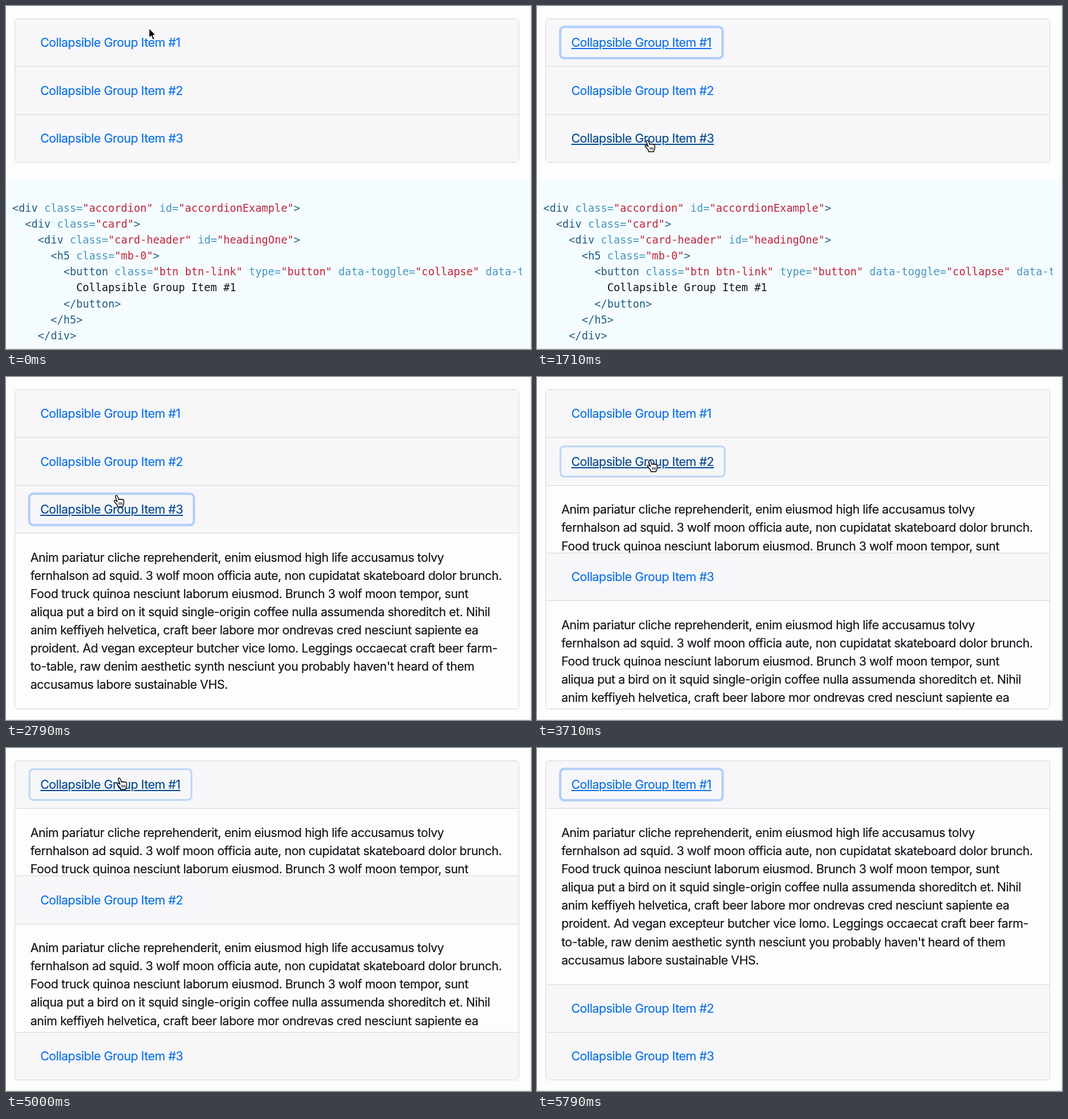
Recreate the animation shown at these times as an HTML page. Size 925x605 px, loop 7580 ms.

```html
<!DOCTYPE html>
<html lang="en">
<head>
<meta charset="utf-8">
<title>Accordion</title>
<style>
  * { box-sizing: border-box; }
  html, body { margin: 0; width: 100%; height: 100%; overflow: hidden; background: #fdfcff; }
  #stage { position: relative; width: 925px; height: 605px; overflow: hidden; font: 21.4px/32.1px Inter, sans-serif; color: #141418; }
  #accordion { margin: 22px 0 0 15px; width: 889px; border: 1px solid #d6d6d8; border-radius: 5px; overflow: hidden; -webkit-text-stroke: .2px; }
  .header { height: 84.33px; border-top: 1px solid #d6d6d8; padding: 16.2px 0 0 27px; background: #f7f7fa; }
  .header:first-child { height: 83.33px; border-top: 0; }
  .button { display: inline-block; height: 50.8px; padding: 9.3px 17.4px; border-radius: 5px; letter-spacing: -.43px; white-space: nowrap; vertical-align: top; }
  .body { border-top: 1px solid #d6d6d8; overflow: hidden; }
  .body div { padding: 25.7px 0 0 27px; white-space: pre; letter-spacing: -.43px; }
  #code { margin-top: 32px; height: 320px; padding-top: 35px; background: #f5fcff; }
  #code pre { margin: 0; width: 909px; padding-left: 11px; overflow: hidden; font: 18.73px/28.1px "DejaVu Sans Mono", monospace; }
  .tag { color: #225f86; }
  .attr { color: #4698c0; }
  .value { color: #c2263a; }
  #edge { position: absolute; inset: 0; border: solid #d9dfd6; border-width: 0 1px 1px 0; }
  #cursor { position: absolute; left: 0; top: 0; overflow: visible; }
</style>
</head>
<body>
<div id="stage">
  <div id="accordion"></div>
  <div id="code"><pre></pre></div>
  <div id="edge"></div>
  <svg id="cursor" width="24" height="24" stroke-linejoin="round">
    <path id="arrow" fill="#000" stroke="#fff" stroke-width="1.2"
      d="M0 0V17.5L4 13.8 6.8 20.6 9.8 19.3 7 12.7H12Z"/>
    <g id="hand" transform="translate(-6 -1)" stroke="#000" stroke-width="1.4">
      <path fill="#fff" d="M5 2.2C3.6 2.8 3.6 4 4 5L7 13 4 11C2 10 .8 11.5 2 13L7.5 19.5V22H16.5L18.5 16.5V10.5C18.5 8.8 16.4 8.6 15.8 10 15.6 8 13 7.8 12.6 9.5 12 7.8 10 8 9.6 9.4L7.4 3.4C7 2.2 6 1.8 5 2.2Z"/>
      <path fill="none" stroke-width="1.1" d="M10.3 14v4.5M12.8 14v4.5M15.3 14v4.5"/>
    </g>
  </svg>
</div>
<script>
const $ = selector => document.querySelector(selector);

const paragraph = `Anim pariatur cliche reprehenderit, enim eiusmod high life accusamus tolvy
fernhalson ad squid. 3 wolf moon officia aute, non cupidatat skateboard dolor brunch.
Food truck quinoa nesciunt laborum eiusmod. Brunch 3 wolf moon tempor, sunt
aliqua put a bird on it squid single-origin coffee nulla assumenda shoreditch et. Nihil
anim keffiyeh helvetica, craft beer labore mor ondrevas cred nesciunt sapiente ea
proident. Ad vegan excepteur butcher vice lomo. Leggings occaecat craft beer farm-
to-table, raw denim aesthetic synth nesciunt you probably haven't heard of them
accusamus labore sustainable VHS.`;

const markup = `<div class="accordion" id="accordionExample">
  <div class="card">
    <div class="card-header" id="headingOne">
      <h5 class="mb-0">
        <button class="btn btn-link" type="button" data-toggle="collapse" data-target="#collapseOne">
          Collapsible Group Item #1
        </button>
      </h5>
    </div>`;

$('#accordion').innerHTML = [1, 2, 3].map(number =>
  `<div class="header"><span class="button">Collapsible Group Item #${number}</span></div>
   <div class="body"><div>${paragraph}</div></div>`).join('');

$('#code pre').innerHTML = markup.replace(/<\/?\w+|>|[\w-]+=|"[^"]*"/g, token => {
  const kind = token[0] === '"' ? 'value' : token.endsWith('=') ? 'attr' : 'tag';
  return `<span class="${kind}">${token.replace('<', '&lt;')}</span>`;
});

const buttons = [...document.querySelectorAll('.button')];
const bodies = [...document.querySelectorAll('.body')];

const LOOP = 7580, BODY_HEIGHT = 310.3, WINDOW_ACTIVE = 13, CLICK_DELAY = 19.5;

// Which item has focus and which is open, from a given time in ms.
const states = [
  { at: 0, focus: -1, open: -1 },
  { at: 1240, focus: 0, open: -1 },
  { at: 2122, focus: 2, open: 2 },
  { at: 3597, focus: 1, open: 1 },
  { at: 4897, focus: 0, open: 0 }
];

// Pointer stops: step, x, y.
const stops = [
  [0, 252, 39], [5, 250, 52], [6, 233, 112], [7, 208, 196], [8, 195, 236],
  [28, 195, 208], [29, 196, 178], [30, 198, 154], [31, 199, 146],
  [42, 199, 134], [43, 199, 92], [44, 200, 60], [45, 200, 52],
  [55, 377, 6], [56, 400, -60]
];

const lastUpTo = (list, fits) => list.filter(fits).pop();
const pointerAt = step => lastUpTo(stops, stop => stop[0] <= step).slice(1);

function bezier(x1, y1, x2, y2) {
  const curve = (a, b, s) => 3 * a * s * (1 - s) ** 2 + 3 * b * s * s * (1 - s) + s ** 3;
  return x => {
    if (x <= 0) return 0;
    if (x >= 1) return 1;
    let low = 0, high = 1;
    for (let i = 0; i < 24; i++) {
      const mid = (low + high) / 2;
      if (curve(x1, x2, mid) < x) low = mid; else high = mid;
    }
    return curve(y1, y2, low);
  };
}
const ease = bezier(.25, .1, .25, 1);
const easeInOut = bezier(.42, 0, .58, 1);

const shownAt = step => Math.round(Math.round(step * 2.4) * 100 / 24) * 10;
function stepAt(time) {
  let step = 0;
  while (shownAt(step + 1) <= time) step++;
  return step;
}

function draw(time) {
  const step = stepAt(time), clock = step * 100;
  const state = lastUpTo(states, s => s.at <= clock);
  const before = states[states.indexOf(state) - 1] || state;
  const glow = easeInOut((clock - state.at) / 150);
  const slide = ease((clock - state.at - CLICK_DELAY) / 350);
  const blend = (key, i, amount) =>
    (state[key] === i ? amount : 0) + (before[key] === i ? 1 - amount : 0);

  bodies.forEach((body, i) => {
    const height = BODY_HEIGHT * blend('open', i, slide);
    body.style.display = height > 0 ? 'block' : 'none';
    body.style.height = height + 'px';
  });

  const pointer = pointerAt(step);
  // Hover lingers briefly after the pointer has left the window.
  const hoverPoint = step >= 55 && step < 58 ? pointerAt(54) : pointer;
  const isOver = (button, [x, y]) => {
    const box = button.getBoundingClientRect();
    return step >= WINDOW_ACTIVE && x > box.left && x < box.right && y > box.top && y < box.bottom;
  };

  buttons.forEach((button, i) => {
    const ring = blend('focus', i, glow);
    const hover = isOver(button, hoverPoint);
    button.style.boxShadow = `0 0 0 ${4.2 * ring}px rgba(20, 115, 240, ${.3 * ring})`;
    button.style.color = hover ? '#06498f' : '#0b70e8';
    button.style.textDecoration = hover || state.focus === i ? 'underline' : 'none';
  });

  const onButton = buttons.some(button => isOver(button, pointer));
  $('#hand').style.display = onButton ? '' : 'none';
  $('#arrow').style.display = onButton ? 'none' : '';
  $('#cursor').style.transform = `translate(${pointer[0]}px, ${pointer[1]}px)`;
}

const start = performance.now();
function tick() {
  draw((performance.now() - start) % LOOP);
  requestAnimationFrame(tick);
}
tick();
</script>
</body>
</html>
```
